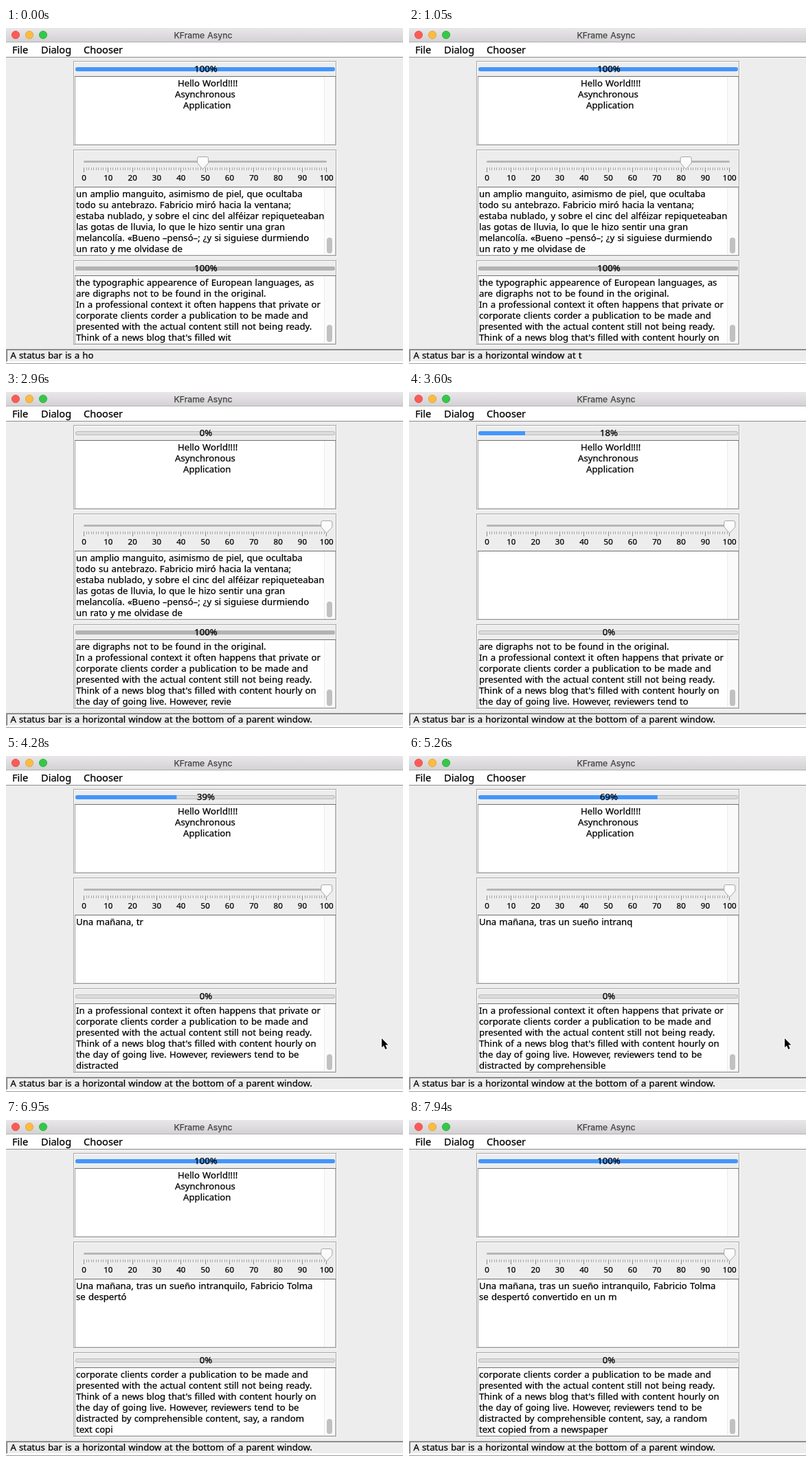
Animation of 578x489 px, one loop 8 s. Source, as an HTML page with a canvas:

```html
<!DOCTYPE html>
<html lang="en">
<head>
<meta charset="utf-8">
<title>KFrame Async</title>
<style>
html, body { margin: 0; width: 100%; height: 100%; overflow: hidden; background: #ededed; }
canvas { display: block; width: 578px; height: 489px; }
</style>
</head>
<body>
<canvas id="stage"></canvas>
<script>
const LOOP = 8000;
const KEY_INTERVAL = 51.7;
const SANS = '"Noto Sans", "Open Sans", sans-serif';
const BODY_FONT = `13.2px ${SANS}`;
const SHADOW = '#a6a6a6';

const STATUS = 'A status bar is a horizontal window at the bottom of a parent window.';
const OLD_STORY = `un amplio manguito, asimismo de piel, que ocultaba
todo su antebrazo. Fabricio miró hacia la ventana;
estaba nublado, y sobre el cinc del alféizar repiqueteaban
las gotas de lluvia, lo que le hizo sentir una gran
melancolía. «Bueno –pensó–; ¿y si siguiese durmiendo
un rato y me olvidase de`;
const NEW_STORY = `Una mañana, tras un sueño intranquilo, Fabricio Tolma
se despertó convertido en un monstruoso`;
const ESSAY = `the typographic appearence of European languages, as
are digraphs not to be found in the original.
In a professional context it often happens that private or
corporate clients corder a publication to be made and
presented with the actual content still not being ready.
Think of a news blog that's filled with content hourly on
the day of going live. However, reviewers tend to be
distracted by comprehensible content, say, a random
text copied from a newspaper or`;
const ESSAY_START = ESSAY.indexOf('h content hourly');

const canvas = document.getElementById('stage');
const ctx = canvas.getContext('2d');
const scale = window.devicePixelRatio || 1;
canvas.width = 578 * scale;
canvas.height = 489 * scale;
ctx.scale(scale, scale);

const clamp = (v, lo, hi) => Math.max(lo, Math.min(hi, v));

function rect(x, y, w, h, color) {
  ctx.fillStyle = color;
  ctx.fillRect(x, y, w, h);
}

function pill(x, y, w, h, color) {
  ctx.fillStyle = color;
  ctx.beginPath();
  ctx.roundRect(x, y, w, h, Math.min(w, h) / 2);
  ctx.fill();
}

function outline(x, y, w, h, color) {
  ctx.strokeStyle = color;
  ctx.lineWidth = 1;
  ctx.strokeRect(x + .5, y + .5, w - 1, h - 1);
}

// A hairline stroke gives the text its slightly heavy smoothing.
function text(str, x, y, font = BODY_FONT, align = 'left', color = '#000') {
  ctx.font = font;
  ctx.textAlign = align;
  ctx.fillStyle = ctx.strokeStyle = color;
  ctx.lineWidth = .25;
  ctx.fillText(str, x, y);
  ctx.strokeText(str, x, y);
}

function verticalGradient(y0, y1, from, to) {
  const g = ctx.createLinearGradient(0, y0, 0, y1);
  g.addColorStop(0, from);
  g.addColorStop(1, to);
  return g;
}

function drawWindow() {
  rect(0, 0, 578, 489, '#ededed');
  rect(0, 0, 578, 20, verticalGradient(0, 20, '#e9e7e9', '#d3d1d3'));
  rect(0, 20, 578, 1, '#b4b2b4');
  [['#fc5b57', '#df4744'], ['#fdbc40', '#de9f34'], ['#34c84a', '#27aa35']].forEach(([fill, edge], i) => {
    ctx.beginPath();
    ctx.arc(14 + 20 * i, 10, 5.6, 0, 7);
    ctx.fillStyle = fill;
    ctx.fill();
    ctx.strokeStyle = edge;
    ctx.lineWidth = .8;
    ctx.stroke();
  });
  text('KFrame Async', 287, 15, '12.3px Inter, Roboto, sans-serif', 'center', '#444');

  rect(0, 21, 578, 21, '#fff');
  rect(0, 42, 578, 1, '#8c8c8c');
  [['File', 9], ['Dialog', 51], ['Chooser', 113]].forEach(([label, x]) =>
    text(label, x, 37, `14.6px ${SANS}`));
}

function drawPanel(y, h) {
  outline(99, y + 1, 383, h, '#fff');
  outline(98, y, 383, h, SHADOW);
}

function drawProgress(y, percent, color) {
  pill(101, y, 378, 6, '#bdbdbd');
  pill(102, y + 1, 376, 4, '#dcdcdc');
  if (percent > 0) {
    ctx.save();
    ctx.beginPath();
    ctx.rect(101, y, 378 * percent / 100, 6);
    ctx.clip();
    pill(101, y, 378, 6, color);
    ctx.restore();
  }
  text(percent + '%', 291, y + 7, BODY_FONT, 'center');
}

function drawTextArea(y) {
  rect(100, y, 380, 100, '#fff');
  rect(464, y + 1, 15, 98, '#fafafa');
  rect(463, y + 1, 1, 98, '#ececec');
  outline(100, y, 380, 100, '#c4c4c4');
  rect(100, y, 1, 100, '#a0a0a0');
  rect(100, y, 380, 1, '#707070');
}

// Splits typed text into lines; a word begun after a wrap stays above while it fits.
function wrapTyped(str) {
  const lines = str.split('\n');
  if (lines.length > 1) {
    const last = lines.at(-1);
    const joined = lines.at(-2) + ' ' + last;
    ctx.font = BODY_FONT;
    if (!last.includes(' ') && ctx.measureText(joined).width <= 361) lines.splice(-2, 2, joined);
  }
  return lines;
}

function drawLines(lines, baseline) {
  lines.slice(-6).forEach((line, i) => text(line, 102, baseline + 16 * i));
}

function drawSlider(value) {
  const xAt = v => 113.5 + 3.533 * v;
  pill(113, 193, 354, 3, '#b7b7b7');
  for (let v = 0; v <= 100; v++) {
    rect(Math.floor(xAt(v)), 203, 1, v % 10 ? 4 : 7, v % 10 ? '#a4a4a4' : '#8a8a8a');
    if (v % 10 === 0) text(v, xAt(v), 222, `11.6px ${SANS}`, 'center');
  }
  const x = xAt(value);
  ctx.beginPath();
  ctx.moveTo(x, 205.5);
  ctx.lineTo(x - 8, 196.5);
  ctx.lineTo(x - 8, 190);
  ctx.quadraticCurveTo(x - 8, 187.5, x - 5.5, 187.5);
  ctx.lineTo(x + 5.5, 187.5);
  ctx.quadraticCurveTo(x + 8, 187.5, x + 8, 190);
  ctx.lineTo(x + 8, 196.5);
  ctx.closePath();
  ctx.fillStyle = verticalGradient(187, 206, '#ffffff', '#f6f6f6');
  ctx.fill();
  ctx.strokeStyle = '#a6a6a6';
  ctx.lineWidth = 1;
  ctx.stroke();
}

function drawStatus(str) {
  rect(0, 485, 578, 2, '#fff');
  rect(0, 467, 578, 1, SHADOW);
  rect(0, 467, 1, 19, SHADOW);
  rect(1, 468, 577, 1, '#747474');
  rect(1, 468, 1, 17, '#747474');
  rect(0, 488, 578, 1, '#a8a8a8');
  text(str, 6.5, 481);
}

function drawPointer(t) {
  if (t < 3900 || t > 5500) return;
  const enter = 1 - clamp((t - 3900) / 300, 0, 1);
  const leave = clamp((t - 5300) / 200, 0, 1);
  ctx.save();
  ctx.translate(547 + 9 * enter + 16 * leave, 411 + 78 * enter * enter - 10 * leave);
  ctx.beginPath();
  [[0, 0], [0, 13], [3, 10.4], [5.3, 15.8], [7.6, 14.8], [5.3, 9.6], [9.4, 9.4]]
    .forEach(([x, y]) => ctx.lineTo(x, y));
  ctx.closePath();
  ctx.strokeStyle = '#fff';
  ctx.lineWidth = 1.6;
  ctx.stroke();
  ctx.fillStyle = '#000';
  ctx.fill();
  ctx.restore();
}

function draw(t) {
  const keys = t / KEY_INTERVAL;
  ctx.wordSpacing = '0.7px';
  drawWindow();

  drawPanel(48, 123);
  drawProgress(57, t < 2490 ? 100 : clamp(Math.floor((t - 3005) / 32.6), 0, 100), '#4296fd');
  drawTextArea(70);
  if (t < 7770) {
    text('Hello World!!!!', 250, 85);
    text('Asynchronous', 246, 101);
    text('Application', 258, 117);
  }

  const restarted = t >= 3040;
  drawPanel(177, 155);
  drawSlider(Math.min(100, Math.floor(49.2 + t / 31.8)));
  drawTextArea(231);
  if (restarted) {
    const typed = Math.max(0, Math.floor((t - 3553) / 51.65));
    drawLines(wrapTyped(NEW_STORY.slice(0, typed)), 246);
  } else {
    drawLines(OLD_STORY.split('\n'), 246);
    pill(467, 305, 8, 23, '#c1c1c1');
  }

  drawPanel(338, 123);
  drawProgress(347, restarted ? 0 : 100, '#b3b3b3');
  drawTextArea(360);
  const essay = wrapTyped(ESSAY.slice(0, ESSAY_START + Math.floor(keys + .33)));
  drawLines(essay, 375);
  const thumbTop = 426 + essay.length;
  pill(467, thumbTop, 8, 457 - thumbTop, '#c1c1c1');

  drawStatus(STATUS.slice(0, Math.floor(20.1 + keys)));
  drawPointer(t);
}

const start = performance.now();
function tick() {
  draw((performance.now() - start) % LOOP);
  requestAnimationFrame(tick);
}
tick();
</script>
</body>
</html>
```
